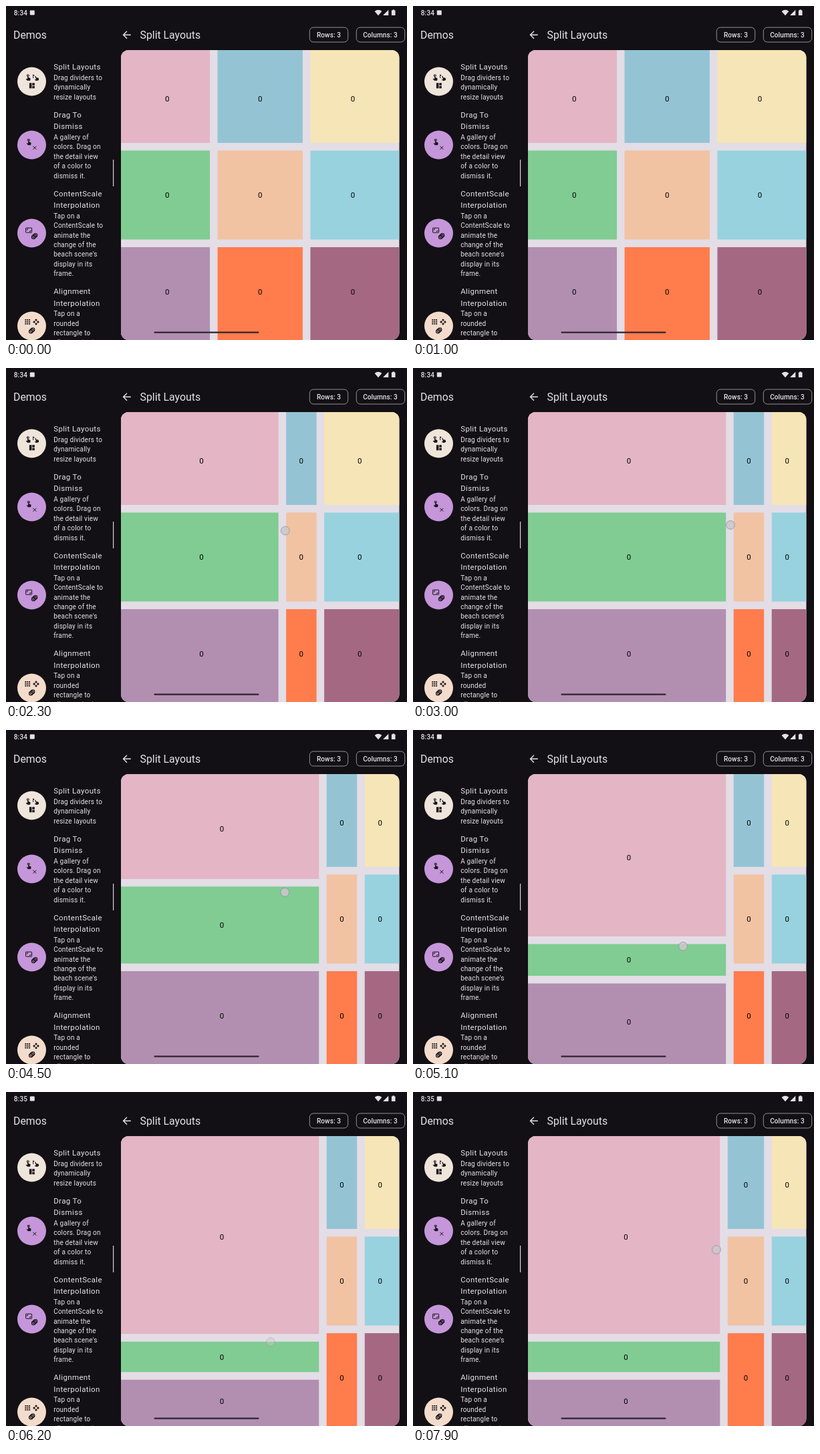
An HTML page that plays this animation: 600x500 px, repeating every 8 s.

```html
<!DOCTYPE html>
<html lang="en">
<head>
<meta charset="utf-8">
<title>Split Layouts</title>
<style>
html, body { margin: 0; width: 100%; height: 100%; overflow: hidden; background: #121014; }
svg { display: block; width: 600px; height: 500px; font-family: Roboto, sans-serif; fill: #e6e1e9; }
.title { font-size: 15.84px; }
.head { font-size: 11.52px; letter-spacing: .36px; }
.body { font-size: 10.08px; letter-spacing: .18px; }
.chip { font-size: 10.08px; font-weight: 500; letter-spacing: .07px; text-anchor: middle; }
.chips rect { fill: none; stroke: #928e98; }
.num { font-size: 11.52px; letter-spacing: .36px; text-anchor: middle; fill: #000; }
.icon { fill: #17131a; }
.line { fill: none; stroke: #17131a; }
</style>
</head>
<body>
<svg viewBox="0 0 600 500">
  <defs>
    <clipPath id="panel"><rect x="172" y="66" width="416.5" height="434" rx="11.5"/></clipPath>
    <path id="hand" d="M18.84 15.87l-4.54-2.26c-.17-.07-.35-.11-.54-.11H13v-6c0-.83-.67-1.5-1.5-1.5S10 6.67 10 7.5v10.74l-3.43-.72c-.4-.08-.75.02-1.03.3l-.79.8 4.94 4.94c.27.27.65.44 1.06.44h6.79c.75 0 1.33-.55 1.44-1.28l.75-5.27c.1-.7-.3-1.32-.89-1.58z"/>
    <path id="tap" d="M9 11.24V7.5a2.5 2.5 0 0 1 5 0v3.74c1.21-.81 2-2.18 2-3.74C16 5 14 3 11.5 3S7 5 7 7.5c0 1.56.79 2.93 2 3.74z"/>
    <g id="rings" class="line" stroke-width="1.1">
      <circle cx="-1.5" cy="1.4" r="2.7"/><circle r="2.7"/><circle cx="1.5" cy="-1.4" r="2.7"/>
    </g>
  </defs>

  <text id="clock" class="body" x="11.7" y="13.7" font-weight="500">8:34</text>
  <rect x="35.8" y="6.6" width="7" height="7" rx="1"/>
  <path d="M551.6 7.9Q557 3.7 562.4 7.9L557 14.3z"/>
  <path d="M572.3 5.8V14h-8.2z"/>
  <path d="M578.4 6.4V5.5h2.6v.9h1.5V14h-5.6V6.4z"/>

  <text class="title" x="11" y="48.7">Demos</text>
  <text class="title" x="200.5" y="48.7">Split Layouts</text>
  <path d="M186.8 43.2H176M181 37.7l-5.5 5.5 5.5 5.5" fill="none" stroke="#e6e1e9" stroke-width="1.4"/>
  <g class="chips">
    <rect x="454.3" y="32" width="57.4" height="22" rx="5.8"/>
    <rect x="524.3" y="32" width="72.4" height="22" rx="5.8"/>
    <text class="chip" x="483" y="46.7">Rows: 3</text>
    <text class="chip" x="560" y="46.7">Columns: 3</text>
  </g>
  <rect x="160" y="230" width="1.2" height="40" fill="#d8d4da"/>

  <g id="list"></g>
  <g class="icon">
    <g transform="translate(27.5 100.8) scale(.46)"><use href="#hand"/><use href="#tap"/></g>
    <g transform="translate(38.4 104) rotate(-20) scale(.42)"><use href="#hand"/></g>
    <path class="line" d="M41 108q-1.2-2.6.2-5M40 103.2h1.7v1.7"/>
    <path transform="translate(33.6 114) scale(.44)" d="M3 3h8v18H3zM13 3h8v8h-8zM13 13h8v8h-8z"/>
    <g transform="translate(28.5 197.3) scale(.46)"><use href="#hand"/><use href="#tap"/></g>
    <path class="line" d="M40.4 209.8l5 5M45.4 209.8l-5 5"/>
    <rect class="line" x="29.6" y="332.2" width="9" height="7" rx=".6"/>
    <path class="line" stroke-width=".9" d="M31.4 335.8v-1.9h1.9M36.8 335.6v1.9h-1.9"/>
    <use href="#rings" x="42.6" y="344.6"/>
    <g id="dots"></g>
    <path d="M45 468.2l1.9 1.9-1.9 1.9-1.9-1.9zM45 474l1.9 1.9-1.9 1.9-1.9-1.9zM42.1 471.1l1.9 1.9-1.9 1.9-1.9-1.9zM47.9 471.1l1.9 1.9-1.9 1.9-1.9-1.9z"/>
    <use href="#rings" x="38.7" y="485.8"/>
  </g>

  <g clip-path="url(#panel)">
    <rect x="172" y="66" width="417" height="434" fill="#e3dde6"/>
    <g id="cells"></g>
  </g>
  <rect x="221.5" y="487.4" width="157" height="2.4" rx="1.2" fill="#2d2530"/>
  <circle id="touch" r="6.4" fill="#cbc7cd" fill-opacity=".85" stroke="#918c96" stroke-opacity=".75"/>
</svg>
<script>
const $ = id => document.getElementById(id);

function add(parent, tag, attrs, text) {
  const el = document.createElementNS('http://www.w3.org/2000/svg', tag);
  set(el, attrs);
  if (text) el.textContent = text;
  return parent.appendChild(el);
}
function set(el, attrs) {
  for (const k in attrs) el.setAttribute(k, attrs[k]);
}

// circle y, colour, first baseline, headline, body
const items = [
  [113, '#f0e5da', 95.4, 'Split Layouts', 'Drag dividers to|dynamically|resize layouts'],
  [208, '#c596d9', 167.2, 'Drag To|Dismiss', 'A gallery of|colors. Drag on|the detail view|of a color to|dismiss it.'],
  [340, '#c596d9', 285.1, 'ContentScale|Interpolation', 'Tap on a|ContentScale to|animate the|change of the|beach scene\'s|display in its|frame.'],
  [479, '#f3dccb', 431.4, 'Alignment|Interpolation', 'Tap on a|rounded|rectangle to|align content']
];
for (const [cy, fill, top, head, body] of items) {
  add($('list'), 'circle', { cx: 38.5, cy, r: 21.5, fill });
  let y = top;
  for (const s of head.split('|')) {
    add($('list'), 'text', { class: 'head', x: 71.2, y }, s);
    y += 17.2;
  }
  y -= 1.7;
  for (const s of body.split('|')) {
    add($('list'), 'text', { class: 'body', x: 71.2, y }, s);
    y += 14.4;
  }
}
for (let i = 0; i < 9; i++)
  add($('dots'), 'rect', { x: 28.4 + i % 3 * 2.9, y: 469 + (i / 3 | 0) * 2.9, width: 1.9, height: 1.9 });

const colors = ['#e3b5c5', '#94c4d4', '#f6e5b6', '#80cc92', '#f1c3a3', '#98d2df', '#b28fb1', '#ff7c4c', '#a46883'];
const cells = colors.map(fill => ({
  box: add($('cells'), 'rect', { fill }),
  num: add($('cells'), 'text', { class: 'num' }, '0')
}));

const LOOP = 8000, STEP = 100, HALF = 5.75, MIN = 57;
const LEFT = 172, RIGHT = 588.5, TOP = 66, BOTTOM = 500;
const ROW1 = 210.7, ROW2 = 355.3, COL1 = 310.8, COL2 = 449.7;
const clamp = v => Math.min(1, Math.max(0, v));
const mix = (a, b, p) => a + (b - a) * p;
const ramp = (t, a, b) => clamp((t - a) / (b - a));
const sine = p => .5 - .5 * Math.cos(Math.PI * p);
const out = p => 1 - (1 - p) ** 1.88;

// each drag: finger shown, moving, released; finger path
const drags = [
  { show: 1200, start: 1420, end: 2930, hide: 3000, ease: sine, from: [321, 258], to: [475, 235] },
  { show: 4150, start: 4400, end: 6000, hide: 6100, ease: out, from: [420, 226], to: [396, 374] },
  { show: 7300, start: 7600, end: 8400, hide: 8400, ease: sine, from: [466, 236], to: [427, 236] }
];

function draw(t) {
  const [p, q, r] = drags.map(d => d.ease(ramp(t, d.start, d.end)));
  const pushed = mix(COL1, 474, p);
  const cols = [LEFT, pushed - 29 * r, Math.max(COL2, pushed + MIN), RIGHT];
  const cut = mix(ROW1, 368, q);
  const gap = mix(59, MIN, ramp(cut, 314.7, 368));
  const split = [TOP, cut, Math.max(ROW2, cut + gap), BOTTOM];
  const even = [TOP, ROW1, ROW2, BOTTOM];

  cells.forEach(({ box, num }, i) => {
    const c = i % 3, n = i / 3 | 0, rows = c ? even : split;
    const x0 = cols[c], x1 = cols[c + 1], y0 = rows[n], y1 = rows[n + 1];
    const x = x0 + (c && HALF), y = y0 + (n && HALF);
    set(box, { x, y, width: x1 - (c < 2 && HALF) - x, height: y1 - (n < 2 && HALF) - y });
    set(num, { x: (x0 + x1) / 2 + .1, y: (y0 + y1) / 2 + 4.3 });
  });

  const d = drags.find(d => t < d.hide + 200) || drags[2];
  const k = d.ease(ramp(t, d.start, d.end));
  set($('touch'), {
    cx: mix(d.from[0], d.to[0], k),
    cy: mix(d.from[1], d.to[1], k),
    opacity: ramp(t, d.show, d.show + 100) * (1 - ramp(t, d.hide, d.hide + 200))
  });
  $('clock').textContent = t < 5900 ? '8:34' : '8:35';
}

const began = performance.now();
function tick() {
  const t = (performance.now() - began) % LOOP;
  draw(Math.floor(t / STEP) * STEP);
  requestAnimationFrame(tick);
}
tick();
</script>
</body>
</html>
```
